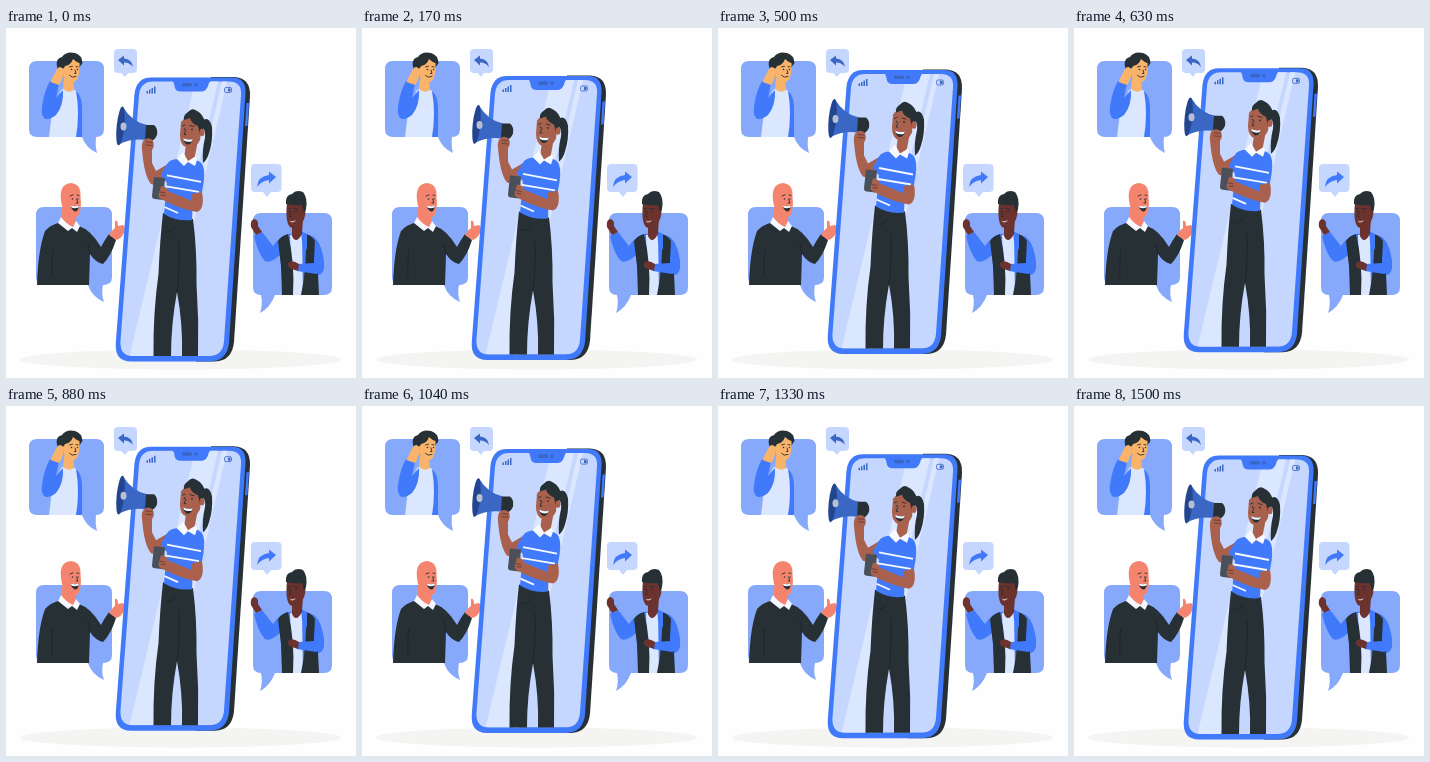
Animation, 350 px wide and 350 px high, one loop 1.54 s. Source, as an HTML page:

```html
<!DOCTYPE html>
<html lang="en">
<head>
<meta charset="utf-8">
<title>Phone announcement</title>
<style>
  html, body { margin: 0; height: 100%; overflow: hidden; background: #fdfefd; }
  svg { display: block; width: 100%; height: 100%; }
  .blue { fill: #4079fa; }
  .steel { fill: #3a66c4; }
  .navy { fill: #234590; }
  .dark { fill: #263035; }
  .bubble { fill: #87a9fb; }
  .pale { fill: #c5d6ff; }
  .light { fill: #dbe6ff; }
  .white { fill: #f6f9ff; }
  .tan { fill: #a9604d; }
  .peach { fill: #f9b36b; }
  .pink { fill: #f5846e; }
  .brown { fill: #6b322e; }
  .line { fill: none; stroke: #263035; stroke-width: .9; stroke-linecap: round; stroke-linejoin: round; }
  .fold { fill: none; stroke: #11171b; stroke-width: .7; stroke-linecap: round; opacity: .6; }
</style>
</head>
<body>
<svg viewBox="0 0 350 350">
  <ellipse cx="174.500" cy="331.500" rx="160.500" ry="10" fill="#f4f4f3"/>

  <!-- listener with a hand at his ear -->
  <g>
    <path class="bubble" d="M31 33H90Q98 33 98 41V101Q98 109 90 109Q89 118 91 125Q80 120 76 109H31Q23 109 23 101V41Q23 33 31 33Z"/>
    <path class="light" d="M55 62L60 59L69 62Q75 68 75 80V109H43L46 84Z"/>
    <path class="peach" d="M58 50L57 61Q63 66 68 62L67 53Z"/>
    <path class="blue" d="M70 63Q76 68 76 80V109H70Q74 86 70 63Z"/>
    <path class="blue" d="M44 53L53 56L50 70L57 62Q58 77 50 87Q42 93 38 90Q34 86 37 73Q39 62 44 53Z"/>
    <path class="dark" d="M52 42Q48 31 56 29Q60 23 69 25Q76 27 76.500 35L73 40H58Z"/>
    <path class="peach" d="M59 38Q65 37 67 31Q70 34 73.500 35Q74 44 71.500 51Q68 56 62 54Q57 50 57 42Z"/>
    <path class="peach" d="M44.500 54Q48 46 51 41Q54 37 57 41Q59 48 53 57Z"/>
    <path class="line" d="M63.500 39l3-.8M70 38.500l2 .5M69 42l1 3.500h-1.500"/>
    <path class="line" d="M63.500 47.500Q66 50.500 70 48.500"/>
    <circle class="dark" cx="65.500" cy="41.500" r=".8"/><circle class="dark" cx="71.500" cy="41.500" r=".7"/>
  </g>

  <!-- reply and share badges -->
  <path class="pale" d="M112 21H127Q131 21 131 25V41Q131 45 127 45H122L119 49L115.500 45H112Q108 45 108 41V25Q108 21 112 21Z"/>
  <path class="steel" d="M112 32L118 27.500V30.500Q126 31 127 39Q123 34 118 34.500V37.500Z"/>
  <path class="pale" d="M249 136H271Q275.500 136 275.500 140V160Q275.500 164 271 164H265L261 169L257 164H249Q245 164 245 160V140Q245 136 249 136Z"/>
  <path class="blue" d="M270 149L263 143.500V147Q252 148 251 159Q256 152.500 263 152V155.500Z"/>

  <!-- bald man with a thumb up -->
  <g>
    <path class="bubble" d="M38 179H98Q106 179 106 187V249Q106 257 97 257Q95 266 98 274Q86 269 82 257H38Q30 257 30 249V187Q30 179 38 179Z"/>
    <path class="dark" d="M55 194Q44 197 39 203Q32 222 31 257H83L84 226Q89 234 97 236Q105 228 110 212L103 206Q98 213 95 219Q85 202 73 198Z"/>
    <path class="pink" d="M56 180L56 194Q63 204 70 197L70 185Z"/>
    <path class="white" d="M55 189L52 195L62 203L66 200L71 204L74 198L70 193L67 199Q60 196 55 189Z"/>
    <path class="pink" d="M55 172Q53 156 65 155Q75 156 74.500 168Q76 182 72 188Q67 192 61 187Q56 182 55 172Z"/>
    <path class="line" d="M64 168l3-1.200M71 167l2 .5M70.500 171l1.500 4h-2"/>
    <circle class="dark" cx="66.500" cy="171" r=".8"/><circle class="dark" cx="72" cy="171" r=".7"/>
    <path class="dark" d="M64.500 177.500Q69 179 73 177.500Q72 184 69 183.500Q65.500 182 64.500 177.500Z"/>
    <path class="white" d="M64.500 177.500Q69 179 73 177.500L72.500 179.500Q68 181 65.500 179.500Z"/>
    <path class="pink" d="M103 207Q106 202 109 200L109 193Q112 192 112 198L117 197Q120 199 118 205Q115 211 110 212Z"/>
    <path class="fold" d="M47 222Q45 238 46 249M84 226L82 216"/>
  </g>

  <!-- listener with a raised fist -->
  <g>
    <path class="bubble" d="M255 185H318Q326 185 326 193V259Q326 267 318 267H269Q264 280 254 285Q257 276 255 267Q247 267 247 259V193Q247 185 255 185Z"/>
    <path class="blue" d="M282 206Q274 208 267 218L256 204L248 208Q252 226 259 233Q264 236 274 227L278 267H312L311 247Q319 247 318 234Q315 212 306 208L296 205Z"/>
    <path class="light" d="M284 207L296 206L297 267H286Z"/>
    <path class="dark" d="M282 206Q275 208 272 213L275 238L276 267H287Q289 235 282 206Z"/>
    <path class="dark" d="M300 206Q307 208 310 215L308 233L312 246L313 267H295Q301 240 300 206Z"/>
    <path class="blue" d="M295 203L301 206L301 222L296 214Z"/>
    <path class="blue" d="M309 211Q317 218 318 237Q318 245 310 246L291 243L292 236L308 235Z"/>
    <path class="brown" d="M293 236Q286 231 282 235Q281 240 286 241L292 243Z"/>
    <path class="brown" d="M250 207L245 199Q244 192 248 191Q253 192 252 198L256 204Z"/>
    <path class="brown" d="M286 194V208Q290 217 296 206L297 190Z"/>
    <path class="brown" d="M281 175Q289 166 299 175Q301 188 296 195Q290 203 284 199Q279 194 281 175Z"/>
    <path class="dark" d="M280 176Q279 167 286 166Q290 161 297 164Q302 170 300 181L298 185L296 177Q288 178 280 176Z"/>
    <path class="line" d="M282 181l2.500-.5M288 180.500l4 .5M285 184l-1.500 4.500h2"/>
    <circle class="dark" cx="283.500" cy="183.500" r=".8"/><circle class="dark" cx="290" cy="183.500" r=".8"/>
    <path class="white" d="M283.500 192.500Q287 194 290 192Q288 195 285.500 194.500Z" opacity=".7"/>
  </g>

  <!-- floating phone and speaker -->
  <g id="phone">
    <path class="dark" d="M205 49H228Q244.500 49.500 244 68L228 314Q226 333 209 333.500H190Z"/>
    <path class="blue" d="M145 49.500H226Q240.500 49.500 239.500 66L223 315Q221 333 204 333.500H125Q108.500 333.500 109.800 315L128.500 66Q130.500 49.500 145 49.500Z"/>
    <path class="blue" d="M240.500 75h2.500l-1.500 23h-2.500Z"/>
    <clipPath id="screen"><path d="M147 53.500H223Q236 53.500 235 67L218 313Q217 328 203 328H127Q113.500 328 114.500 313L133 67Q134.500 53.500 147 53.500Z"/></clipPath>
    <g clip-path="url(#screen)">
      <rect class="pale" x="105" y="49" width="140" height="282"/>
      <path class="light" d="M190 50H213L147 330H123ZM217 50H222L156 330H151Z"/>
    </g>
    <path class="blue" d="M164 51H207Q203 53 202 58Q200 63.500 195 63.500H175Q169 63.500 168.500 58Q168 53 164 51Z"/>
    <rect class="steel" x="176" y="55" width="10" height="3.500" rx="1.700"/><circle class="steel" cx="190" cy="56.800" r="1.800"/>
    <path class="steel" d="M140.500 63h1.500v2.500h-1.500ZM143 61.500h1.500v4h-1.500ZM145.500 60h1.500v5.500h-1.500ZM148 58.500h1.500v7h-1.500Z"/>
    <rect x="218.500" y="59.500" width="7" height="5" rx="1.500" fill="none" stroke="#3a66c4" stroke-width=".8"/>
    <rect class="steel" x="222" y="60.500" width="2.500" height="3"/>

    <path class="dark" d="M157 185L187 191Q191 222 190.500 256Q193 292 192 328H176Q177 296 171 264Q165 296 165 328H147.500Q147 284 152.500 246Q154 210 157 185Z"/>
    <path class="fold" d="M171 264Q174 240 173 214M160 204Q166 205 169 199"/>

    <path class="dark" d="M196 93Q203 87 206 99Q207 113 203 125Q201 132 197 135Q196 122 199 110Q200 102 196 99Z"/>
    <path class="tan" d="M136 121L146 120L146 135L150 143L162 136L160 152Q151 158 145 156Q138 148 136 121Z"/>
    <path class="blue" d="M173 131Q164 131 161 136L154.500 147L161 155L158 186Q171 194 186 192L187 168L196 164Q200 145 197 138Q195 133 189 132Z"/>
    <path d="M161 147.500L195 154M160 158.500L193 164M158.500 179L172 185" fill="none" stroke="#f6f9ff" stroke-width="1.800"/>
    <path class="tan" d="M180 116L178 131Q182 138 188 133L192 112Z"/>
    <path class="white" d="M177 124L171 131L178 138L182 134L189 138L191 132L190 128L182 133Z"/>

    <path d="M148 149L159 150L157 172L149 171Q146 171 146 168Z" fill="#495059"/>
    <path class="tan" d="M186 166L196 164Q199 181 191 184Q174 181 157 172Q151 170 153 165L155 158Q160 158 162 163L186 173Z"/>
    <path class="fold" d="M154 164l5 1M155 167l4 .5"/>

    <path class="tan" d="M175 94Q183 84 196 94L194 112Q190 121 181 119.500Q174 118 174 107Z"/>
    <path class="dark" d="M178 92Q177 87 182 84Q186 79 191 83Q197 86 199 94L197 103L194 107Q193 102 192 98Q185 95 184 90Q181 91 178 92Z"/>
    <ellipse class="tan" cx="196" cy="104.500" rx="2.500" ry="3.700"/>
    <path class="line" d="M176.500 98l2.500-1M184 97.500l4 1M180 102l-2 4.500h2"/>
    <circle class="dark" cx="178.500" cy="101" r=".8"/><circle class="dark" cx="186" cy="101.500" r=".9"/>
    <path class="dark" d="M177 110Q182 112.500 187 111Q185 117 181 116.500Q178 115 177 110Z"/>
    <path class="white" d="M177 110Q182 112.500 187 111L185.500 113.500Q181 114.500 178 112.500Z"/>

    <path class="steel" d="M117 79Q126 94 141 97L140 112Q125 110 112 117Z"/>
    <ellipse class="navy" cx="114.500" cy="98" rx="3.800" ry="19.500" transform="rotate(6 114.500 98)"/>
    <ellipse cx="117.500" cy="98.500" rx="3" ry="4" fill="#b9bfd0"/>
    <path class="dark" d="M140 97L148 97Q152 100 151 107Q149 112 145 113L139 112Z"/>
    <path class="tan" d="M136 122Q135 114 139 111Q145 109 147 113Q149 118 146 122Z"/>
    <path class="fold" d="M140 114l6 .5M140 117l6 .5"/>
  </g>
</svg>
<script>
  const PERIOD = 1540, RISE = 9.6, LEAD = 30;
  const phone = document.getElementById("phone");

  function draw() {
    const phase = (performance.now() + LEAD) % PERIOD / PERIOD;
    const lift = RISE * (1 - Math.cos(2 * Math.PI * phase)) / 2;
    phone.setAttribute("transform", `translate(0 ${-lift})`);
    requestAnimationFrame(draw);
  }
  draw();
</script>
</body>
</html>
```
